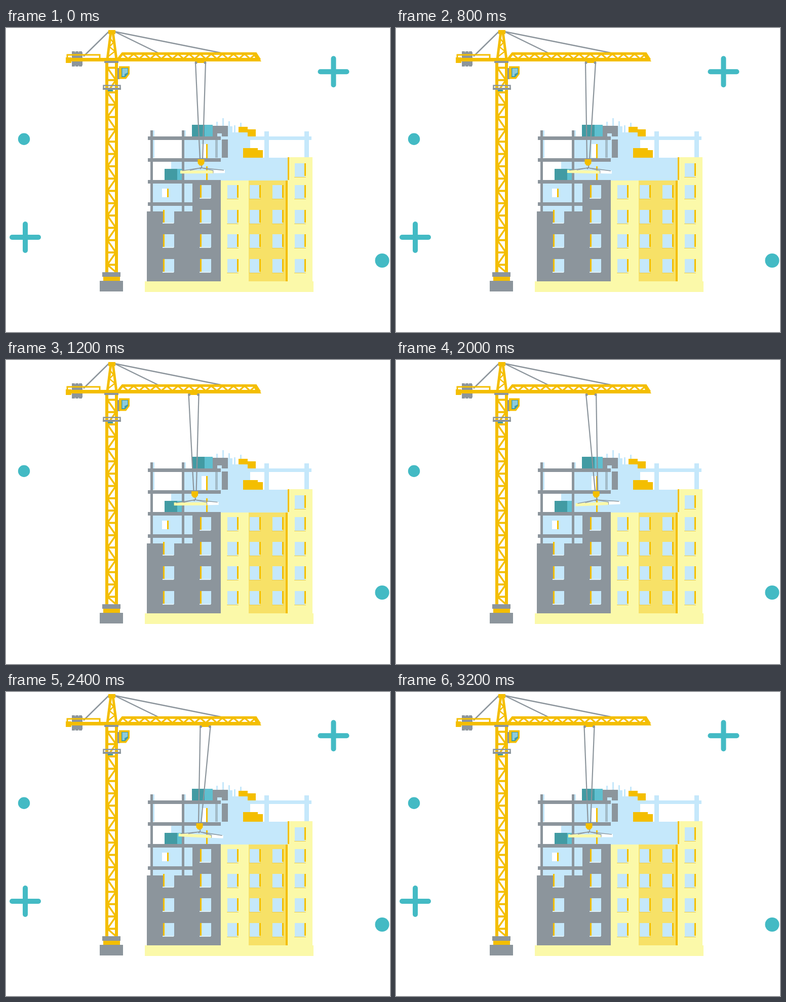
These frames come from a looping animation (758 by 600 pixels, 3600 ms). An HTML page with a canvas:

```html
<!DOCTYPE html>
<html lang="en">
<head>
<meta charset="utf-8">
<title>Tower crane</title>
<style>
html, body { margin: 0; height: 100%; overflow: hidden; background: #fff; }
canvas { display: block; }
</style>
</head>
<body>
<canvas id="stage" width="758" height="600"></canvas>
<script>
const ctx = document.getElementById('stage').getContext('2d');
const yellow = '#f4be00', amber = '#f7e167', pale = '#fbf9a9', gray = '#8c959c',
  sky = '#c5e8fb', teal = '#43bac4', deep = '#429ba3', aqua = '#5fc0d0', white = '#fff';

function box(color, x, y, w, h) {
  ctx.fillStyle = color;
  ctx.fillRect(x, y, w, h);
}
function trace(points) {
  ctx.beginPath();
  for (let i = 0; i < points.length; i += 2) ctx.lineTo(points[i], points[i + 1]);
}
function line(color, width, ...points) {
  trace(points);
  ctx.strokeStyle = color;
  ctx.lineWidth = width;
  ctx.stroke();
}
function shape(color, ...points) {
  trace(points);
  ctx.fillStyle = color;
  ctx.fill();
}
function dot(color, x, y, r) {
  ctx.beginPath();
  ctx.arc(x, y, r, 0, 7);
  ctx.fillStyle = color;
  ctx.fill();
}
function plus(x, y) {
  ctx.lineCap = 'round';
  line(teal, 10, x - 26, y, x + 26, y);
  line(teal, 10, x, y - 26, x, y + 26);
  ctx.lineCap = 'butt';
}

function windowLeft(x, y) {
  box(sky, x, y, 20, 26);
  box(yellow, x - 2, y, 3, 25);
  box('#dceef6', x - 3, y + 25, 22, 2);
}
function windowRight(x, y) {
  box(sky, x, y, 20, 27);
  box(yellow, x + 19, y, 3, 25);
  box('#eccb4a', x - 1, y + 27, 23, 1);
}
function container(x, y, w, h) {
  box(deep, x, y, 25, h);
  box(aqua, x + 25, y, w - 25, h);
}

function drawRooms() {
  box(sky, 290, 307, 78, 56);
  box(sky, 326, 263, 98, 38);
  box(sky, 352, 220, 72, 43);
  box(sky, 424, 206, 58, 51);
  box(sky, 424, 256, 132, 45);
  box(sky, 438, 194, 9, 13);
  box(sky, 482, 214, 121, 7);
  for (const x of [510, 589]) box(sky, x, 204, 9, 52);
  for (const x of [290, 352]) box(sky, x, 202, 3, 54);
  for (let i = 0; i < 5; i++) {
    const top = Math.round(185 - 7 * Math.sin(i * 1.5));
    box(sky, Math.round(415 + i * 11.8), top, 3, 207 - top);
  }
  box(white, 386, 229, 10, 27);
  for (const y of [229, 273]) box(yellow, 395, y, 3, 28);
  box(white, 308, 317, 10, 17);
  box(yellow, 318, 317, 3, 17);
}

function drawMaterial() {
  container(367, 191, 41, 23);
  container(313, 278, 34, 23);
  box(gray, 408, 193, 30, 21);
  box(sky, 417, 208, 9, 13);
  box(gray, 426, 220, 12, 36);
  box('#a3bcc8', 413, 220, 5, 36);
  box(yellow, 459, 195, 18, 11);
  box(yellow, 477, 200, 16, 14);
  box(yellow, 468, 237, 29, 19);
  box(yellow, 468, 241, 39, 15);
}

function drawWalls() {
  for (const x of [285, 347]) box(gray, x, 202, 5, 161);
  for (let i = 0; i < 4; i++) box(gray, 280, Math.round(214 + i * 43.2), i < 3 ? 144 : 88, 7);

  box(gray, 278, 362, 146, 138);
  box(gray, 368, 301, 56, 62);
  box(pale, 424, 301, 56, 199);
  box(amber, 479, 301, 74, 199);
  box(pale, 556, 255, 49, 245);
  box(yellow, 552, 301, 4, 199);
  box(yellow, 556, 255, 3, 45);
  box(pale, 274, 500, 333, 21);

  for (let row = -1; row < 4; row++) {
    const y = Math.round(310 + row * 48.6);
    for (let i = 0; i < 4; i++)
      if (row >= 0) windowRight(Math.round(437 + i * 44.3), y);
    if (row >= 0) windowLeft(385, y);
    if (row > 0) windowLeft(312, y);
  }
  windowRight(570, 267);
}

function drawTower() {
  const step = 24.3;
  for (let i = 0; i < 17; i++) {
    const y = 78.5 + i * step, end = Math.min(y + step, 482);
    const [from, to] = i % 2 ? [217, 200] : [200, 217];
    line(yellow, 4, 200, y, 217, y);
    line(yellow, 3.5, from, y, to, end);
  }
  for (const x of [196, 215]) box(yellow, x, 68, 6, 414);

  // Platform and foot
  line(gray, 2.5, 192.5, 119, 192.5, 113.5, 225.5, 113.5, 225.5, 119);
  box(gray, 191, 118, 36, 4);
  box(deep, 201, 122, 10, 3);
  box(gray, 190, 482, 36, 9);
  box(yellow, 192, 491, 33, 9);
  box(gray, 185, 499, 46, 21);
}

function drawJib() {
  for (const [x, y] of [[153, 56], [300, 49], [424, 49]]) line(gray, 2.5, x < 208 ? 203 : 214, 7, x, y);

  // Apex
  line(yellow, 2.5, 202, 56, 215, 46, 204, 37, 212, 29, 206, 21);
  for (const side of [-1, 1]) line(yellow, 5, 209 + side * 9, 62, 209 + side * 2, 8);
  box(yellow, 202, 4, 14, 8);

  // Counterweight and beam
  for (let i = 0; i < 3; i++) {
    box(gray, 130 + i * 7, 48, 7, 26);
    box(gray, 130 + i * 7, 46, 6, 30);
  }
  box(yellow, 118, 58, 11, 11);
  box(yellow, 120, 59, 382, 7);
  line(yellow, 3, 121, 59, 121, 53, 185, 53, 185, 59);
  const web = [];
  for (let i = 0; i <= 24; i++) web.push(230 + i * 10.95, i % 2 ? 61 : 51);
  line(yellow, 3.2, ...web);
  line(yellow, 5, 220, 63, 230, 50.5, 493, 50.5, 501, 63);
  shape(yellow, 492, 48, 504, 66, 496, 66, 488, 52);
  box(gray, 194, 65, 28, 4);

  // Cab
  box(gray, 220, 79, 5, 22);
  shape(yellow, 223, 75.5, 244, 75.5, 244, 91, 237, 100.5, 223, 100.5);
  shape(deep, 228, 79, 241, 79, 241, 90.5, 235, 97, 228, 97);
  shape('#8ccbdc', 229.5, 80, 240, 80, 240, 88, 234, 91, 234, 95, 229.5, 95);
}

function drawLoad(trolley, swing) {
  const hook = trolley + swing;
  line(gray, 2.2, trolley - 10, 68, hook - 2, 260);
  line(gray, 2.2, trolley + 10, 68, hook + 3, 260);
  box(yellow, trolley - 11, 64, 22, 5);
  for (const side of [-9, 9]) dot(gray, trolley + side, 68.5, 2.5);

  // The beam leans against the swing
  ctx.save();
  ctx.translate(hook, 277);
  ctx.rotate(-swing / 4 * Math.PI / 180);
  box(pale, -41, 4, 65, 6);
  box(white, 24, 3.5, 23, 6);
  line(gray, 1, 24, 4, 24, 9.5);
  line(gray, 1.4, -37, 4.5, 0, -1, 45, 4);
  line(gray, 1.2, -22, 4, 0, -1, 24, 4.5);
  ctx.restore();

  line(gray, 2, hook, 270, hook + 1.5, 274, hook - 1, 277.5, hook - 3, 276);
  shape(yellow, hook - 6.5, 259, hook + 6.5, 259, hook + 6.5, 267, hook + 3, 271.5, hook - 3, 271.5, hook - 6.5, 267);
}

const loop = 3600, hold = 400, leg = 800;
const trolleyStops = [384, 384, 365, 393.5, 381.5];
const swingStops = [1, -5, 19, -11.5, -0.5];
const easeOut = u => Math.sin(u * Math.PI / 2);
const easeIn = u => 1 - Math.cos(u * Math.PI / 2);

function along(stops, time, ease) {
  const i = Math.floor(time / leg), next = stops[(i + 1) % stops.length];
  return stops[i] + (next - stops[i]) * ease(time % leg / leg);
}

function draw(now) {
  const time = Math.floor(now % loop / hold) * hold;
  // Ornaments vanish around the middle: pluses first, then dots
  const away = Math.abs(time - 1600) / hold;
  box(white, 0, 0, 758, 600);
  if (away > 0) {
    dot(teal, 35.5, 219.3, 11.7);
    dot(teal, 742.5, 459, 14);
  }
  if (away > 1) {
    plus(646.5, 86.3);
    plus(38, 413);
  }
  drawRooms();
  drawMaterial();
  drawWalls();
  drawTower();
  drawJib();
  drawLoad(along(trolleyStops, time, easeOut), along(swingStops, time, easeIn));
}

let start;
function tick(now) {
  start ??= now;
  draw(now - start);
  requestAnimationFrame(tick);
}
requestAnimationFrame(tick);
</script>
</body>
</html>
```
